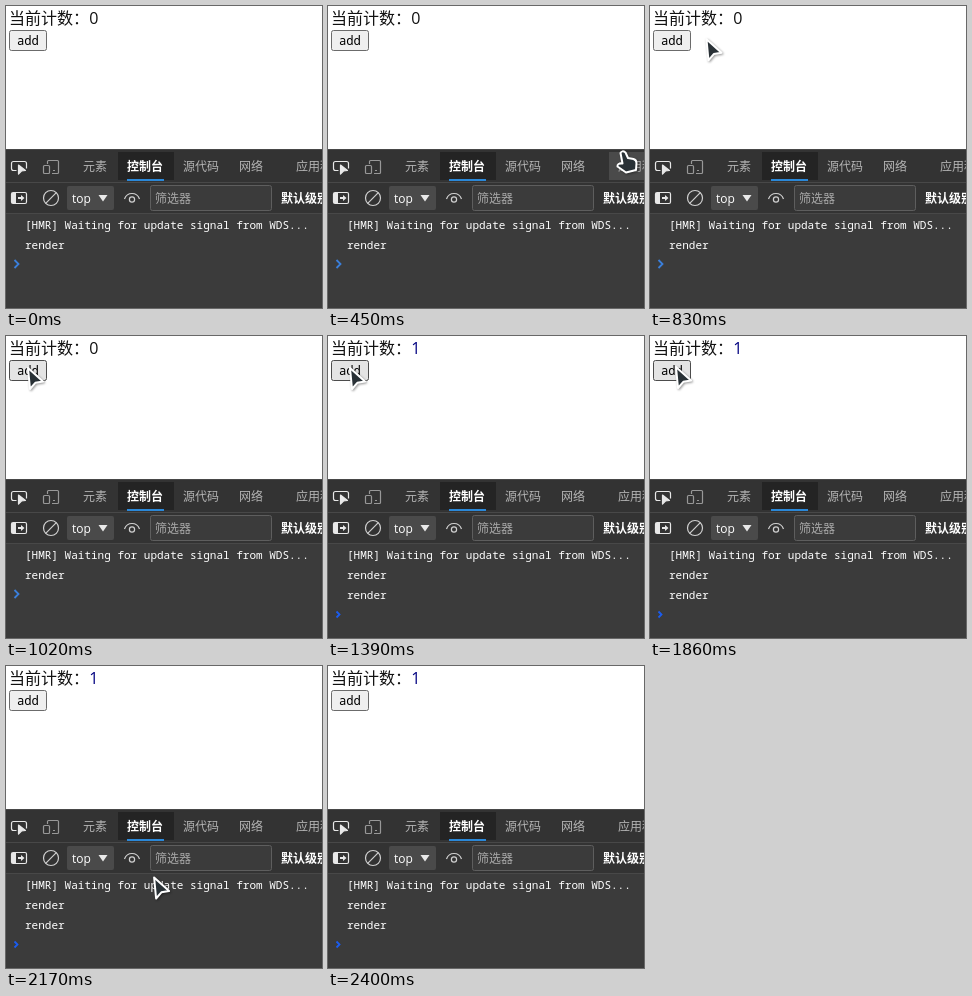
Animation of 316 by 302 pixels, one loop 3.25 s. Source, as an HTML page:

```html
<!DOCTYPE html>
<html lang="zh-CN">
<head>
<meta charset="utf-8">
<title>Counter</title>
<style>
html, body { margin: 0; height: 100%; overflow: hidden; background: #fff; }
svg { display: block; }
text { white-space: pre; font-family: "Open Sans", "Noto Sans CJK SC", "Noto Sans CJK", sans-serif; }
.mono text, text.mono { font-family: "Noto Sans Mono", monospace; font-weight: 500; }
.ui { font-size: 12px; }
.icon { fill: none; stroke: #d0d0d0; stroke-width: 1.2; stroke-linejoin: round; }
.cursor { fill: #293136; stroke: #fff; stroke-width: 2; stroke-linejoin: round;
  filter: drop-shadow(1px 1px 1px #0006); }
</style>
</head>
<body>
<svg width="316" height="302" viewBox="0 0 316 302">
  <text x="3" y="18" font-size="16" font-weight="300" fill="#111">当前计数：</text>
  <text id="count" x="83.3" y="18" font-size="16">0</text>
  <rect id="button" x="3.5" y="24.5" width="37" height="20" rx="2"/>
  <text class="mono" x="11" y="39" font-size="12.2">add</text>

  <rect y="143" width="316" height="65" fill="#333"/>
  <rect y="208" width="316" height="94" fill="#3b3b3b"/>
  <path d="M0 143.5H316M0 176.5H316M0 207.5H316" stroke="#484848"/>

  <rect id="tab" x="281" y="146" width="35" height="28" fill="#4a4a4a"/>
  <rect x="112" y="146" width="56" height="28" fill="#242424"/>
  <rect x="121" y="173" width="37" height="2" fill="#2b88d8"/>
  <g class="ui" fill="#b4b4b4">
    <text x="77" y="165">元素</text>
    <text x="121" y="165" fill="#fff" font-weight="bold">控制台</text>
    <text x="177" y="165">源代码</text>
    <text x="233" y="165">网络</text>
    <text x="290" y="165">应用程序</text>
  </g>

  <g class="icon">
    <path d="M10.5 164.5H7.5Q5.5 164.5 5.5 162.5V157.5Q5.5 155.5 7.5 155.5H18.5Q20.5 155.5 20.5 157.5V162.5" stroke="#e8e8e8"/>
    <path d="M12.5 159L19.5 164.5L15.5 165L12.5 168Z" fill="#e8e8e8" stroke="#e8e8e8"/>
    <path d="M41.5 158V155.5Q41.5 154.5 42.5 154.5H51.5Q52.5 154.5 52.5 155.5V166.5Q52.5 167.5 51.5 167.5H46M47 164.5H49" stroke="#989898"/>
    <rect x="37.5" y="159.5" width="6" height="8" rx="1" stroke="#989898"/>
    <rect x="5.5" y="186.5" width="15" height="11" rx="1.5" stroke="#e8e8e8"/>
    <path d="M6 187H10V197H6ZM18.5 192L15 189V191H12V193H15V195Z" fill="#e8e8e8" stroke="none"/>
    <circle cx="45" cy="192" r="7.5"/>
    <path d="M39.7 197.3L50.3 186.7"/>
    <path d="M118.5 193Q120.5 187.5 126 187.5T133.5 193"/>
    <circle cx="126" cy="193.5" r="2.6"/>
  </g>
  <rect x="61" y="180" width="47" height="24" rx="2" fill="#4a4a4a"/>
  <text class="ui" x="66" y="196.5" fill="#fff">top</text>
  <path d="M92.5 189H101.5L97 195.5Z" fill="#e8e8e8"/>
  <rect x="144.5" y="179.5" width="121" height="25" rx="2" fill="#3b3b3b" stroke="#5e5e5e"/>
  <text class="ui" x="149" y="196.5" fill="#a8a8a8">筛选器</text>
  <text class="ui" x="275" y="196.5" fill="#fff" font-weight="bold">默认级别</text>

  <g class="mono" font-size="11" fill="#fff">
    <text x="19" y="223">[HMR] Waiting for update signal from WDS...</text>
    <text x="19" y="243">render</text>
    <text id="log" x="19" y="263">render</text>
  </g>
  <path id="prompt" fill="none" stroke-width="1.8"/>

  <path id="cursor" class="cursor"/>
</svg>
<script>
const [count, button, tab, log, prompt, cursor] =
  ["count", "button", "tab", "log", "prompt", "cursor"].map(id => document.getElementById(id));
const ARROW = "M0 0L15 13.5L7.3 14.8L2 21Z";
const HAND = "M-4.5 0Q-3 -3 0.5 -0.5L3 5L8.5 6Q11.5 7 11.5 10L11 17L1 19.5L-7.5 13.5Q-8 10 -2.5 10.5Z";
const LOOP = 3250, CLICK = 1320, STEP = 31.7;

const show = (el, on) => el.setAttribute("visibility", on ? "visible" : "hidden");
// Pointer position advances in short, even ticks
const ticks = ms => Math.floor(ms / STEP + 0.25);

function pointer(t) {
  if (t < 450 || t >= 2400) return null;
  if (t < 1860) {
    const left = 1 - Math.min(1, ticks(t - 450) / 18);
    return [22 + 275 * left ** 1.89, 32 + 115 * left ** 4.08];
  }
  const s = ticks(t - 1860) / 16;
  return s > 1 ? null : [26 + 238 * s ** 1.42, 31 + 270 * s ** 0.857];
}

function draw() {
  const t = performance.now() % LOOP;
  const clicked = t >= CLICK;
  const pos = pointer(t);
  const [x, y] = pos || [-99, -99];
  const onTabs = y >= 143 && y < 175;
  const onButton = x >= 3 && x <= 41 && y >= 24 && y <= 45;

  count.textContent = clicked ? 1 : 0;
  count.setAttribute("fill", clicked ? "#000080" : "#111");
  show(log, clicked);
  prompt.setAttribute("d", clicked ? "M8.5 275.5L11.5 278.5L8.5 281.5" : "M8.5 254L12.5 258L8.5 262");
  prompt.setAttribute("stroke", clicked ? "#1a5cf0" : "#3b80dc");
  button.setAttribute("fill", onButton ? "#e4e4e4" : "#efefef");
  button.setAttribute("stroke", onButton ? "#4c4c4c" : "#6b6b6b");
  show(tab, onTabs && x >= 281);

  show(cursor, pos);
  cursor.setAttribute("d", onTabs ? HAND : ARROW);
  cursor.setAttribute("transform", `translate(${x} ${y})`);
  requestAnimationFrame(draw);
}
draw();
</script>
</body>
</html>
```
